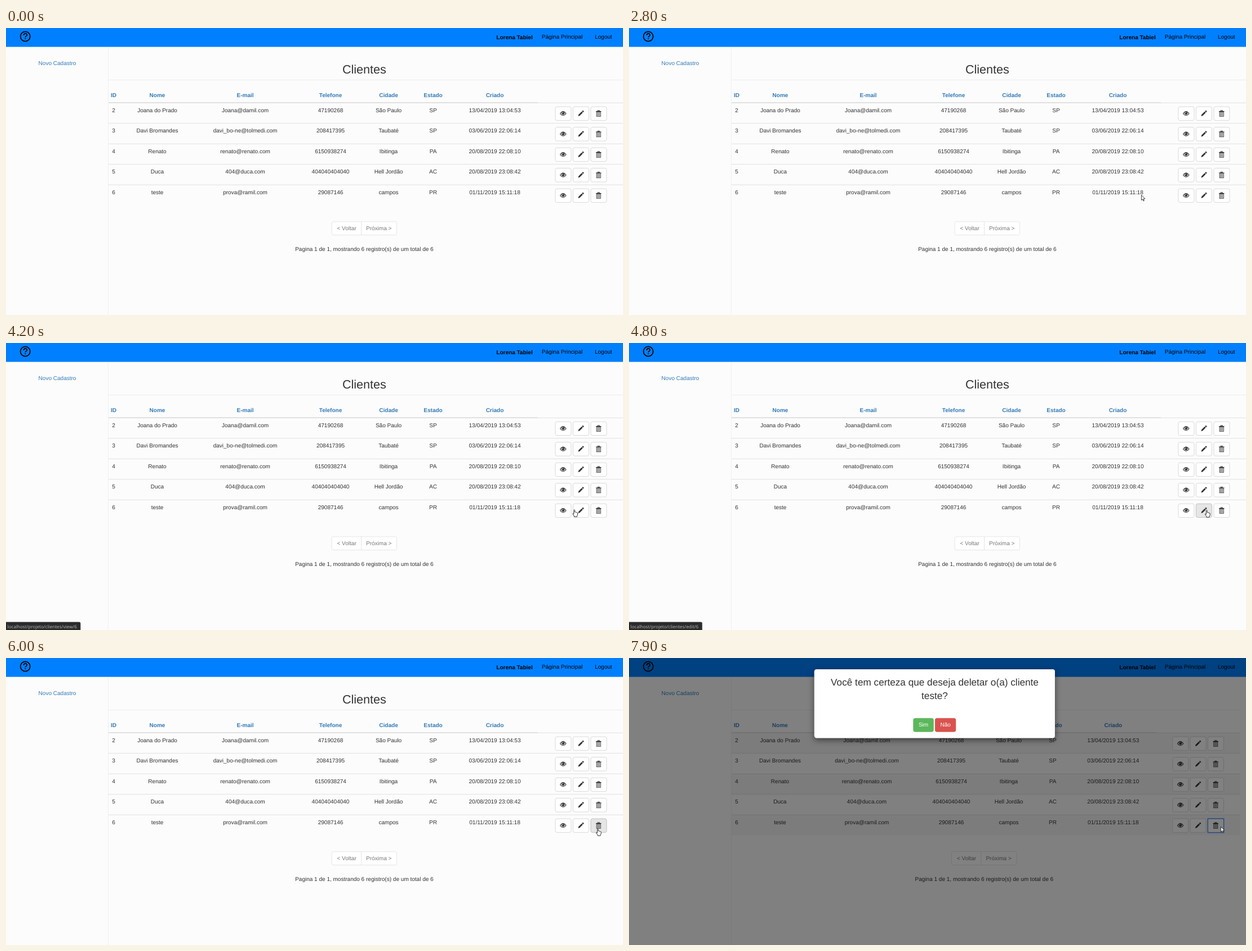
An HTML page with a canvas that plays this animation: 1095 by 511 pixels, repeating every 8 s.

```html
<!DOCTYPE html>
<html lang="pt-BR">
<head>
<meta charset="utf-8">
<title>Clientes</title>
<style>
html, body { margin: 0; width: 100%; height: 100%; overflow: hidden; background: #fcfcfc; }
canvas { display: block; }
</style>
</head>
<body>
<canvas id="stage" width="1095" height="511"></canvas>
<script>
const ctx = document.getElementById('stage').getContext('2d');
const W = 1095, H = 511, LOOP = 8000, MODAL_AT = 7900;
const SANS = '"Liberation Sans", Arial, sans-serif';
const LINK = '#337ab7', INK = '#333', BASE = 10.03;

const HEADS = ['ID', 'Nome', 'E-mail', 'Telefone', 'Cidade', 'Estado', 'Criado'];
const ROWS = [
  ['2', 'Joana do Prado', 'Joana@damil.com', '47190268', 'São Paulo', 'SP', '13/04/2019 13:04:53'],
  ['3', 'Davi Bromandes', 'davi_bo-ne@tolmedi.com', '208417395', 'Taubaté', 'SP', '03/06/2019 22:06:14'],
  ['4', 'Renato', 'renato@renato.com', '6150938274', 'Ibitinga', 'PA', '20/08/2019 22:08:10'],
  ['5', 'Duca', '404@duca.com', '404040404040', 'Hell Jordão', 'AC', '20/08/2019 23:08:42'],
  ['6', 'teste', 'prova@ramil.com', '29087146', 'campos', 'PR', '01/11/2019 15:11:18']
];
const WIDE = {
  cols: [191, 268.5, 424.5, 576, 679, 758, 867.5],
  buttons: [974.5, 1006, 1037.5], headEnd: 944, right: 1095, mid: 635.8
};
const NARROW = {
  cols: [191, 268, 422, 572, 674, 752, 859.3],
  buttons: [964.3, 995.6, 1027], headEnd: 935, right: 1085, mid: 630.2
};

// Pointer track: time, x, y
const TRACK = [
  [300, 678, 345], [600, 559, 89], [700, 559, 89], [1300, 620, 154],
  [1600, 620, 154], [2100, 628, 282], [2400, 628, 282], [2600, 780, 310],
  [2800, 909, 297], [2900, 909, 297], [3000, 909, 293], [3100, 909, 293],
  [3800, 983, 296], [4000, 986, 296], [4200, 1005, 296], [4500, 1016, 297],
  [4700, 1016, 297], [5200, 1044, 296], [5300, 1044, 296], [6100, 1047, 304],
  [7000, 1047, 304], [7200, 1047, 297], [7400, 1047, 301]
];

function text(str, x, y, { size = BASE, color = INK, bold = false, align = 'center', family = SANS } = {}) {
  ctx.font = `${bold ? 'bold ' : ''}${size}px ${family}`;
  ctx.fillStyle = color;
  ctx.textAlign = align;
  ctx.fillText(str, x, y);
}

function rect(x, y, w, h, color) {
  ctx.fillStyle = color;
  ctx.fillRect(x, y, w, h);
}

function box(x, y, w, h, r, fill, stroke, line = 0.72) {
  ctx.beginPath();
  ctx.roundRect(x, y, w, h, r);
  ctx.fillStyle = fill;
  ctx.fill();
  if (!stroke) return;
  ctx.strokeStyle = stroke;
  ctx.lineWidth = line;
  ctx.stroke();
}

function poly(points) {
  ctx.beginPath();
  points.forEach(([x, y]) => ctx.lineTo(x, y));
  ctx.closePath();
}

function at(x, y, draw) {
  ctx.save();
  ctx.translate(x, y);
  draw();
  ctx.restore();
}

function eye() {
  ctx.strokeStyle = ctx.fillStyle = INK;
  ctx.lineWidth = 1.1;
  ctx.beginPath();
  ctx.moveTo(-5.2, 0);
  ctx.quadraticCurveTo(0, -7.2, 5.2, 0);
  ctx.quadraticCurveTo(0, 7.2, -5.2, 0);
  ctx.stroke();
  ctx.beginPath();
  ctx.arc(0, -0.4, 2.6, 0, 7);
  ctx.fill();
  ctx.fillStyle = '#fff';
  ctx.beginPath();
  ctx.arc(-0.8, -1.2, 0.8, 0, 7);
  ctx.fill();
}

function pencil() {
  ctx.rotate(-Math.PI / 4);
  ctx.fillStyle = INK;
  poly([[-6.8, 0], [-4.3, -1.4], [3.4, -1.4], [3.4, 1.4], [-4.3, 1.4]]);
  ctx.fill();
  ctx.beginPath();
  ctx.roundRect(4.1, -1.4, 2.5, 2.8, 0.7);
  ctx.fill();
}

function trash() {
  ctx.strokeStyle = INK;
  ctx.lineWidth = 0.9;
  rect(-4.8, -4.3, 9.6, 1.1, INK);
  ctx.strokeRect(-1.6, -5.4, 3.2, 1.4);
  ctx.strokeRect(-3.6, -2.7, 7.2, 7.8);
  for (const x of [-1.8, 0, 1.8]) rect(x - 0.4, -2, 0.8, 6.4, INK);
}

const ICONS = [eye, pencil, trash];

function arrow() {
  poly([[0.4, 0.4], [0.4, 9.6], [2.5, 7.7], [3.9, 11], [5.3, 10.4], [3.9, 7.2], [6.8, 7]]);
  ctx.fillStyle = '#fff';
  ctx.fill();
  ctx.strokeStyle = '#111';
  ctx.lineWidth = 0.8;
  ctx.stroke();
}

function hand() {
  ctx.beginPath();
  ctx.moveTo(2.8, 8.3);
  ctx.lineTo(2.8, 1.5);
  ctx.quadraticCurveTo(3.6, -0.3, 4.5, 1.5);
  ctx.lineTo(4.5, 5);
  ctx.quadraticCurveTo(5.7, 4.3, 6.3, 5.5);
  ctx.quadraticCurveTo(7.5, 4.9, 8, 6);
  ctx.quadraticCurveTo(9.6, 5.7, 9.6, 7.2);
  ctx.lineTo(9.4, 10);
  ctx.lineTo(8.3, 12);
  ctx.lineTo(8.3, 13.4);
  ctx.lineTo(3.5, 13.4);
  ctx.lineTo(3.4, 12);
  ctx.lineTo(0.6, 8.2);
  ctx.quadraticCurveTo(0.8, 6.7, 2.8, 8.3);
  ctx.fillStyle = '#fff';
  ctx.fill();
  ctx.strokeStyle = '#111';
  ctx.lineWidth = 0.85;
  ctx.stroke();
}

function drawNav() {
  rect(0, 0, W, 33.6, '#0080ff');
  ctx.strokeStyle = '#000';
  ctx.lineWidth = 1.7;
  ctx.beginPath();
  ctx.arc(34.2, 15, 8.6, 0, 7);
  ctx.stroke();
  ctx.beginPath();
  ctx.moveTo(31.4, 13);
  ctx.bezierCurveTo(31.4, 8.8, 37.2, 8.8, 37.2, 12.6);
  ctx.bezierCurveTo(37.2, 14.6, 34.3, 14.4, 34.3, 16.8);
  ctx.stroke();
  rect(33.4, 18.2, 1.8, 1.8, '#000');
  text('Lorena Tabiel', 902.5, 20, { bold: true, color: '#000' });
  text('Página Principal', 987, 19, { color: '#000' });
  text('Logout', 1060.3, 19, { color: '#000' });
}

function drawTable(page, hovered, modal) {
  HEADS.forEach((name, i) => text(name, page.cols[i], 122.8, { bold: true, color: LINK }));
  ROWS.forEach((row, r) => {
    const top = 133 + r * 36.5;
    if (modal && r % 2 === 0) rect(182, top, page.right - 182, 36.5, '#f4f4f4');
    rect(182, top - 0.2, page.right - 182, 0.9, '#ddd');
    row.forEach((cell, i) => text(cell, page.cols[i], top + 16.8));
    page.buttons.forEach((x, i) => {
      const last = r === ROWS.length - 1;
      const hot = last && i === hovered;
      box(x + 0.4, top + 7.2, 28, 24.4, 2.9, hot ? '#e6e6e6' : '#fff', hot ? '#adadad' : '#ccc');
      if (modal && last && i === 2) {
        ctx.strokeStyle = '#4d90fe';
        ctx.lineWidth = 1.4;
        ctx.strokeRect(x + 0.2, top + 7, 28.4, 24.8);
      }
      at(x + 14.2, top + 19.2, ICONS[i]);
    });
  });
  rect(182, 132.2, page.headEnd - 182, 1.3, '#ddd');
}

function drawPage(page, hovered, modal) {
  rect(0, 0, W, H, '#fcfcfc');
  rect(181, 34, 1, H - 34, '#f0f0f0');
  drawNav();
  text('Novo Cadastro', 91, 65.8, { color: LINK });
  text('Clientes', page.mid, 81.2, { size: 21.5 });
  rect(182, 92, page.right - 182, 0.8, '#eaeaea');
  drawTable(page, hovered, modal);

  const left = page.mid - 57.8;
  box(left, 344.8, 115.4, 23.8, 2.9, '#fff', '#ddd');
  rect(left + 52.1, 345, 0.8, 23.4, '#ddd');
  text('< Voltar', left + 26.6, 359.6, { color: '#777' });
  text('Próxima >', left + 83.7, 359.6, { color: '#777' });
  text('Pagina 1 de 1, mostrando 6 registro(s) de um total de 6', page.mid + 0.1, 397.2);
}

function drawModal() {
  rect(0, 0, W, H, 'rgba(0,0,0,.495)');
  ctx.save();
  ctx.shadowColor = 'rgba(0,0,0,.5)';
  ctx.shadowBlur = 11;
  ctx.shadowOffsetY = 3.6;
  box(328.8, 20, 427.2, 122.6, 4.3, '#fff');
  ctx.restore();
  box(328.8, 20, 427.2, 122.6, 4.3, '#fff', 'rgba(0,0,0,.2)');
  text('Você tem certeza que deseja deletar o(a) cliente', 542.5, 48.6, { size: 17.2 });
  text('teste?', 542.5, 72.8, { size: 17.2 });
  box(504.8, 107.4, 35.5, 23.8, 2.9, '#5cb85c', '#4cae4c');
  box(543.4, 107.4, 36.4, 23.8, 2.9, '#d9534f', '#d43f3a');
  text('Sim', 522.5, 122.4, { color: '#fff' });
  text('Não', 561.6, 122.4, { color: '#fff' });
}

function drawStatus(t) {
  if (t < 3700 || t >= 5500) return;
  const view = t < 4300;
  ctx.globalAlpha = t < 5100 ? 1 : t < 5400 ? 0.8 : 0.35;
  box(-2, 497, view ? 134 : 131.7, 16, 2, '#2b2b2b', '#444');
  text(`localhost/projeto/clientes/${view ? 'view' : 'edit'}/6`, 2.6, 507.6,
    { size: 8.1, color: '#b8bbbf', align: 'left', family: '"Open Sans", sans-serif' });
  ctx.globalAlpha = 1;
}

function pointer(t) {
  const i = TRACK.findIndex(key => key[0] > t);
  if (i < 0) return TRACK[TRACK.length - 1].slice(1);
  const [t0, x0, y0] = TRACK[i - 1], [t1, x1, y1] = TRACK[i];
  const k = (t - t0) / (t1 - t0);
  return [x0 + (x1 - x0) * k, y0 + (y1 - y0) * k];
}

function hoveredButton(t) {
  if (t >= MODAL_AT) return -1;
  if (t >= 5000) return 2;
  if (t >= 4300 && t < 4900) return 1;
  return t >= 3600 && t < 4100 ? 0 : -1;
}

function render(time) {
  const t = Math.floor((time % LOOP) / 100) * 100;
  const modal = t >= MODAL_AT;
  ctx.textRendering = 'geometricPrecision';
  drawPage(modal ? NARROW : WIDE, hoveredButton(t), modal);
  if (modal) {
    drawModal();
    at(1050, 300, arrow);
    return;
  }
  drawStatus(t);
  if (t >= 300) {
    const [x, y] = pointer(t);
    at(x, y, x > 970 ? hand : arrow);
  }
}

const start = performance.now();
function tick() {
  render(performance.now() - start);
  requestAnimationFrame(tick);
}
tick();
</script>
</body>
</html>
```
